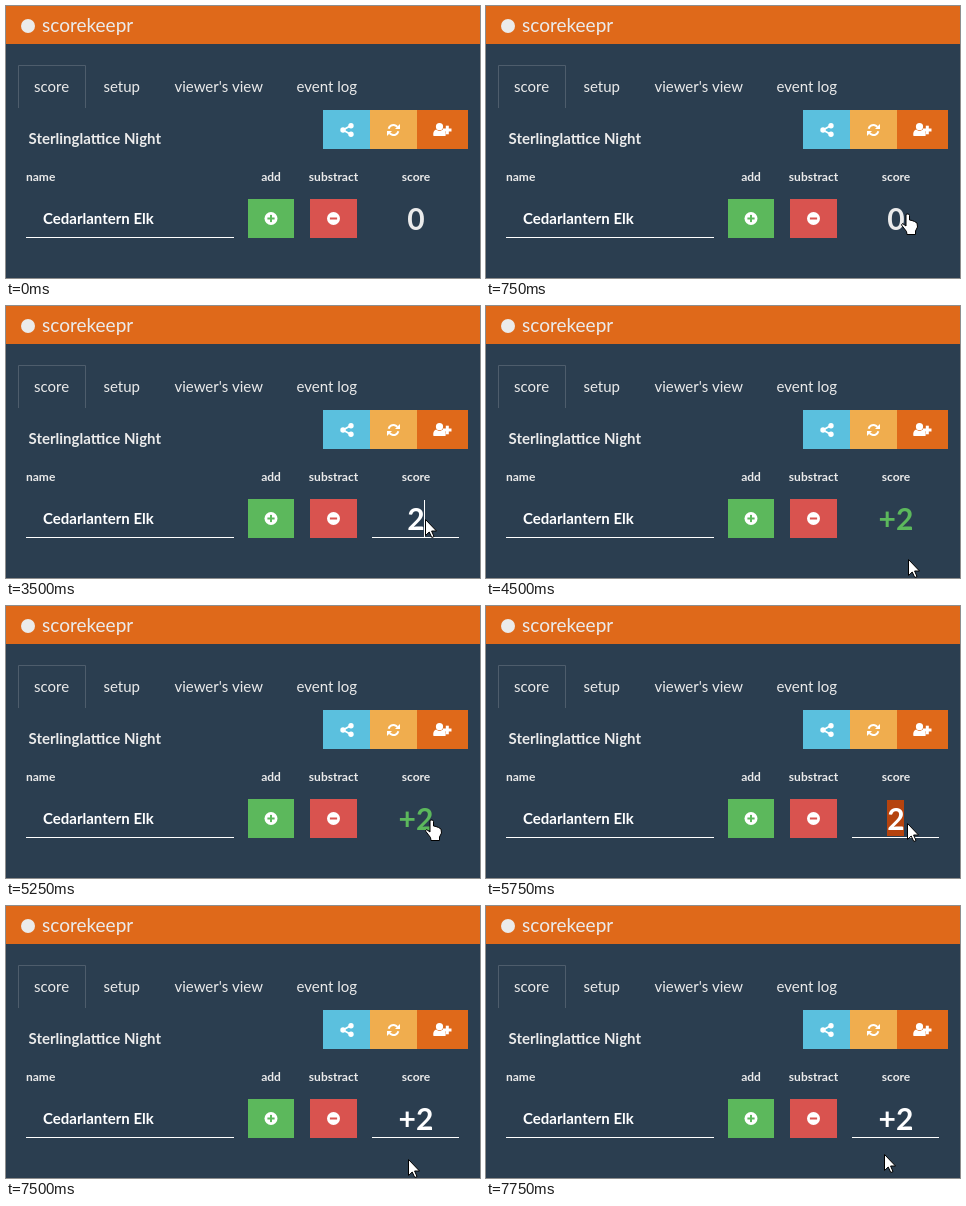
These frames come from a looping animation (474x272 px, 8 s). An HTML page with a canvas:

```html
<!DOCTYPE html>
<html lang="en">
<head>
<meta charset="utf-8">
<title>Score board</title>
<style>
  html, body { margin: 0; width: 100%; height: 100%; overflow: hidden; background: #2b3e50; }
  canvas { display: block; }
</style>
</head>
<body>
<canvas id="stage" width="474" height="272"></canvas>
<script>
const ctx = document.getElementById('stage').getContext('2d');
const LOOP = 8000;
const C = {
  bg: '#2b3e50', orange: '#df691a', text: '#ebebeb', white: '#fff', border: '#4e5d6c',
  blue: '#5bc0de', yellow: '#f0ad4e', green: '#5cb85c', red: '#d9534f', select: '#b5430e'
};

// [start ms, x, y, shape]
const pointerSteps = [
  [0, 0, 0, null], [250, 390, 242, 'arrow'], [500, 418, 223, 'hand'], [750, 415, 207, 'hand'],
  [1500, 419, 213, 'arrow'], [4000, 415, 208, 'arrow'], [4250, 425, 243, 'arrow'],
  [4500, 422, 253, 'arrow'], [5000, 420, 224, 'hand'], [5250, 419, 213, 'hand'],
  [5500, 421, 217, 'arrow'], [7500, 402, 253, 'arrow'], [7750, 398, 248, 'arrow']
];

// [start ms, text, colour, editing, mark]
const scoreSteps = [
  [0, '0', C.text, false], [1500, '0', C.white, true], [1750, '0', C.white, true, 'select'],
  [3500, '2', C.white, true, 'caret'], [4000, '2', C.white, true],
  [4500, '+2', C.green, false], [5500, '+2', C.green, true], [5750, '2', C.white, true, 'select'],
  [6500, '+', C.white, true, 'caret'], [6750, '+2', C.white, true, 'caret'],
  [7500, '+2', C.white, true]
];

const stepAt = (steps, t) => steps.filter(s => s[0] <= t).pop();

function rect(x, y, w, h, color) {
  ctx.fillStyle = color;
  ctx.fillRect(x, y, w, h);
}

function disc(x, y, r, color = C.white) {
  ctx.fillStyle = color;
  ctx.beginPath();
  ctx.arc(x, y, r, 0, Math.PI * 2);
  ctx.fill();
}

function label(text, x, y, size, weight = 400, color = C.text, align = 'left') {
  ctx.font = `${weight} ${size}px Lato, sans-serif`;
  ctx.fillStyle = color;
  ctx.textAlign = align;
  ctx.fillText(text, x, y);
}

function shape(points, x = 0, y = 0) {
  ctx.beginPath();
  points.forEach(([px, py]) => ctx.lineTo(x + px, y + py));
  ctx.closePath();
}

function shareIcon() {
  ctx.strokeStyle = C.white;
  ctx.lineWidth = 1.8;
  ctx.beginPath();
  ctx.moveTo(345, 119.5);
  ctx.lineTo(337, 124);
  ctx.lineTo(345, 128.5);
  ctx.stroke();
  [[345, 119.8], [337, 124], [345, 128.2]].forEach(([x, y]) => disc(x, y, 2.7));
}

function refreshIcon() {
  ctx.strokeStyle = ctx.fillStyle = C.white;
  ctx.lineWidth = 2;
  for (const turn of [0, Math.PI]) {
    ctx.save();
    ctx.translate(387.5, 124);
    ctx.rotate(turn);
    ctx.beginPath();
    ctx.arc(0, 0, 5, Math.PI * 1.08, Math.PI * 1.78);
    ctx.stroke();
    shape([[6.5, -6], [6.5, -1], [1.5, -1]]);
    ctx.fill();
    ctx.restore();
  }
}

function addUserIcon() {
  disc(433.5, 120.7, 3.6);
  ctx.beginPath();
  ctx.moveTo(427.5, 130);
  ctx.bezierCurveTo(426.5, 126, 429, 123, 431, 124);
  ctx.quadraticCurveTo(433.5, 125.8, 436, 124);
  ctx.bezierCurveTo(438.5, 123, 440.5, 126, 439.5, 130);
  ctx.fill();
  rect(437, 122.5, 8.5, 3, C.white);
  rect(439.8, 119.7, 3, 8.6, C.white);
}

function signButton(x, w, color, plus) {
  const cx = x + w / 2;
  rect(x, 193, w, 39, color);
  disc(cx, 212.5, 6.5);
  rect(cx - 3.6, 211.5, 7.2, 2, color);
  if (plus) rect(cx - 1, 208.9, 2, 7.2, color);
}

function drawPage() {
  rect(0, 0, 474, 272, C.bg);
  rect(0, 0, 474, 38, C.orange);
  disc(22, 20, 7, C.text);
  label('scorekeepr', 36, 26, 19);

  ctx.strokeStyle = C.border;
  ctx.lineWidth = 1;
  ctx.beginPath();
  ctx.moveTo(12.5, 102);
  ctx.lineTo(12.5, 59.5);
  ctx.lineTo(79.5, 59.5);
  ctx.lineTo(79.5, 102);
  ctx.stroke();
  [['score', 28], ['setup', 97.5], ["viewer's view", 168.5], ['event log', 290.5]]
    .forEach(([text, x]) => label(text, x, 86, 15));

  rect(317, 104, 47, 39, C.blue);
  rect(364, 104, 47, 39, C.yellow);
  rect(411, 104, 51, 39, C.orange);
  shareIcon();
  refreshIcon();
  addUserIcon();

  label('Sterlinglattice Night', 22.5, 138, 15, 700);
  label('name', 20, 175, 12, 700);
  [['add', 265], ['substract', 327.5], ['score', 410]]
    .forEach(([text, x]) => label(text, x, 175, 12, 700, C.text, 'center'));

  label('Cedarlantern Elk', 37, 218, 15, 700, C.white);
  rect(20, 231, 208, 1, C.white);
  signButton(242, 46, C.green, true);
  signButton(304, 47, C.red, false);
}

function drawScore([, text, color, editing, mark]) {
  const mid = 410;
  ctx.font = '700 30px Lato, sans-serif';
  const half = ctx.measureText(text).width / 2;
  if (editing) rect(366, 231, 87, 1, C.white);
  if (mark === 'select') rect(Math.round(mid - half), 194, Math.round(half * 2), 36, C.select);
  label(text, mid, 224, 30, 700, color, 'center');
  if (mark === 'caret') rect(Math.floor(mid + half), 194, 1, 37, C.white);
}

const arrow = [[0.5, 0.5], [0.5, 16.5], [4.2, 13], [6.8, 18.5], [9, 17.6], [6.6, 12], [11.5, 12]];
const hand = [
  [5.5, 1], [7.5, 1], [8.5, 2.5], [8.5, 7], [11, 7.5], [13.5, 8.5], [16, 10],
  [16.5, 14], [14.5, 18], [14.5, 21.5], [6, 21.5], [5.5, 18.5], [0.5, 12],
  [1.5, 10.5], [5, 13], [5, 2]
];

function drawPointer([, x, y, kind]) {
  if (!kind) return;
  shape(kind === 'hand' ? hand : arrow, x, y);
  ctx.fillStyle = C.white;
  ctx.strokeStyle = '#000';
  ctx.lineWidth = 1;
  ctx.fill();
  ctx.stroke();
}

const start = performance.now();

function frame() {
  const t = (performance.now() - start) % LOOP;
  drawPage();
  drawScore(stepAt(scoreSteps, t));
  drawPointer(stepAt(pointerSteps, t));
  requestAnimationFrame(frame);
}
frame();
</script>
</body>
</html>
```
